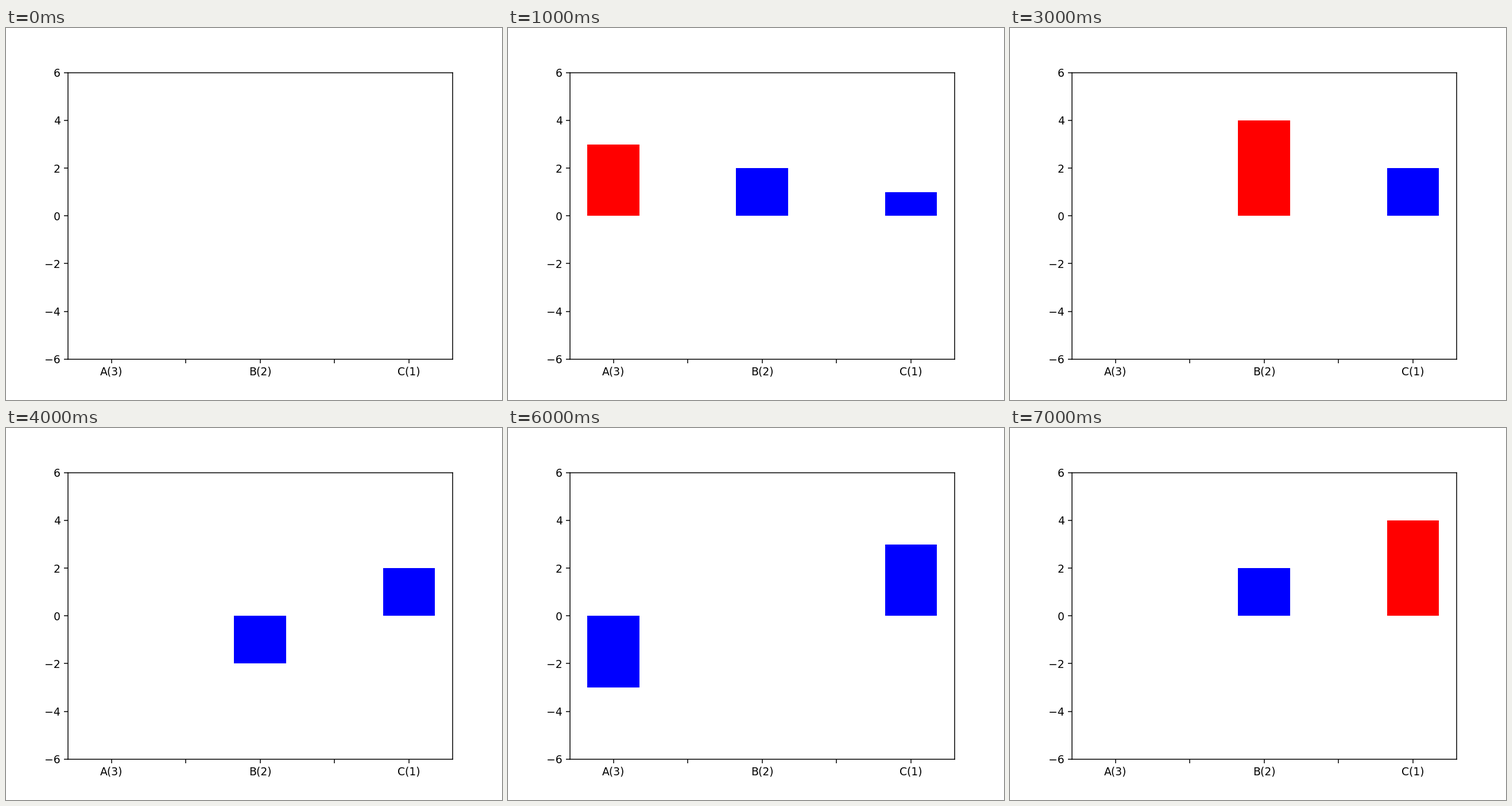
Animation, 864 px wide and 648 px high, one loop 8 s. Source, as a matplotlib script:

```python
import numpy as np
import matplotlib.pyplot as plt
from matplotlib.animation import FuncAnimation

NAMES = "ABC"
WEIGHTS = np.array([3, 2, 1])
STEPS = 8


def round_robin(steps):
    """Smooth weighted round robin: add the weights, pick the largest, charge it the total."""
    current = np.zeros(len(WEIGHTS), dtype=int)
    states = [(current.copy(), None)]
    while len(states) < steps:
        current += WEIGHTS
        best = int(np.argmax(current))
        states.append((current.copy(), best))
        current[best] -= WEIGHTS.sum()
        states.append((current.copy(), None))
    return states[:steps]


plt.rcParams["font.family"] = "DejaVu Sans"
fig, ax = plt.subplots(figsize=(6.4, 4.8), dpi=135)
x = np.arange(len(NAMES))
bars = ax.bar(x, np.zeros(len(x)), width=0.35, color="blue")

labels = [f"{name}({weight})" for name, weight in zip(NAMES, WEIGHTS)]
ax.set_xlim(-0.2925, 2.2925)
ax.set_ylim(-6, 6)
ax.set_xticks(np.arange(0, 2.5, 0.5),
              [labels[0], "", labels[1], "", labels[2]])

states = round_robin(STEPS)


def update(frame):
    heights, chosen = states[frame]
    for i, (bar, height) in enumerate(zip(bars, heights)):
        bar.set_height(height)
        bar.set_color("red" if i == chosen else "blue")
        bar.set_linewidth(0)
        bar.set_visible(height != 0)
    return list(bars)


anim = FuncAnimation(fig, update, frames=STEPS, interval=1000,
                     repeat=True, repeat_delay=0, blit=False)
plt.show()
```
